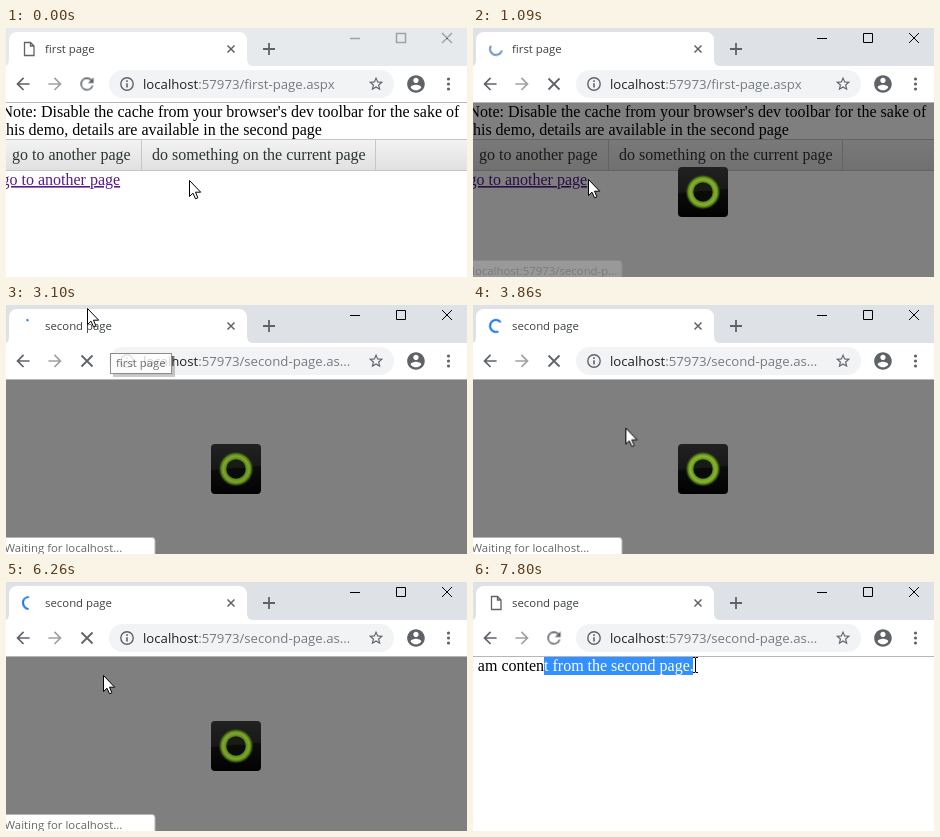
Write an HTML page that moves like this. It is 461 px wide and 249 px high and loops after 8 s.

```html
<!DOCTYPE html>
<html lang="en">
<head>
<meta charset="utf-8">
<title>Page loader demo</title>
<style>
html, body { margin: 0; width: 100%; height: 100%; overflow: hidden; background: #fff; }
svg { position: fixed; left: 0; top: 0; display: block; }
text { white-space: pre; }
.ui { font: 11.4px "Open Sans", "Noto Sans", sans-serif; fill: #3c4043; }
.url { font-size: 13.2px; fill: #202124; }
.path { fill: #777b80; }
.page { font: 16px "Liberation Serif", Times, serif; fill: #000; }
.menu { fill: #2e3436; }
.icon { fill: #5f6368; }
.status { fill: #666; }

/* one shared 8 s timeline; 1% = 80 ms */
.a { animation: 8s step-end infinite; }
.smooth { animation-timing-function: linear; }
.blurred { animation-name: blurred; }
.busy { animation-name: busy; }
.idle { animation-name: idle; }
.first { animation-name: first; }
.second { animation-name: second; }
.loaded { animation-name: loaded; }
.hover { animation-name: hover; }
.waiting { animation-name: waiting; }
.tip { animation-name: tip; }
.arrow { animation-name: arrow, arrowOn; animation-timing-function: linear, step-end; }
.beam { animation-name: beam, loaded; animation-timing-function: linear, step-end; }
.select { animation-name: select; }
.glow { animation: glow .8s ease-in-out infinite alternate; }

@keyframes blurred { 0% { opacity: 1 } 6.75%, 100% { opacity: 0 } }
@keyframes busy { 0% { opacity: 0 } 6.75% { opacity: 1 } 86%, 100% { opacity: 0 } }
@keyframes idle { 0% { opacity: 1 } 6.75% { opacity: 0 } 86%, 100% { opacity: 1 } }
@keyframes first { 0% { opacity: 1 } 32.8%, 100% { opacity: 0 } }
@keyframes second { 0% { opacity: 0 } 32.8%, 100% { opacity: 1 } }
@keyframes loaded { 0% { opacity: 0 } 86%, 100% { opacity: 1 } }
@keyframes arrowOn { 0% { opacity: 1 } 86%, 100% { opacity: 0 } }
@keyframes hover { 0%, 4.8% { opacity: 0 } 5.8%, 11.9% { opacity: 1 } 14.1%, 100% { opacity: 0 } }
@keyframes waiting { 0%, 16.5% { opacity: 0 } 17.4%, 89.8% { opacity: 1 } 92.7%, 100% { opacity: 0 } }
@keyframes tip { 0%, 35.6% { opacity: 0 } 36.6%, 38.4% { opacity: 1 } 40.5%, 100% { opacity: 0 } }
@keyframes arrow {
  0% { transform: translate(183px, 152px) }
  5.8%, 8% { transform: translate(104px, 152px) }
  11%, 14% { transform: translate(115px, 151px) }
  20% { transform: translate(200px, 162px) }
  24.5%, 25.4% { transform: translate(241px, 168px) }
  29.5% { transform: translate(104px, 28px) }
  33% { transform: translate(98px, 16px) }
  36% { transform: translate(87px, 6px) }
  38.5%, 39% { transform: translate(81px, 3px) }
  45% { transform: translate(130px, 90px) }
  52% { transform: translate(178px, 160px) }
  57.5%, 58.5% { transform: translate(183px, 187px) }
  67% { transform: translate(150px, 150px) }
  78%, 78.6% { transform: translate(97px, 93px) }
  86%, 100% { transform: translate(72px, 84px) }
}
@keyframes beam {
  0%, 94.7% { transform: translate(71px, 83px) }
  97.4%, 100% { transform: translate(222px, 83px) }
}
@keyframes select { 0%, 94.7% { width: 0 } 97.4%, 100% { width: 149px } }
@keyframes glow { from { opacity: .9 } to { opacity: 1 } }
</style>
</head>
<body>
<svg width="461" height="249" viewBox="0 0 461 249">
  <defs>
    <linearGradient id="bar" x2="0" y2="1">
      <stop stop-color="#f3f3f3"/><stop offset="1" stop-color="#e0e0e0"/>
    </linearGradient>
    <linearGradient id="tile" x2="0" y2="1">
      <stop stop-color="#151515"/><stop offset="1" stop-color="#020202"/>
    </linearGradient>
    <radialGradient id="ring" gradientUnits="userSpaceOnUse" cx="230" cy="164" r="18">
      <stop offset=".5" stop-color="#38500f"/>
      <stop offset=".58" stop-color="#6c9920"/>
      <stop offset=".72" stop-color="#8aba30"/>
      <stop offset=".84" stop-color="#5d8619"/>
      <stop offset="1" stop-color="#16200a" stop-opacity="0"/>
    </radialGradient>
    <clipPath id="sel"><rect class="a smooth select" x="71" y="75" width="0" height="18"/></clipPath>
    <path id="back" d="M20 11H7.83l5.59-5.59L12 4l-8 8 8 8 1.41-1.41L7.83 13H20z"/>
  </defs>

  <!-- page -->
  <rect width="461" height="249" fill="#fff"/>
  <g class="a first">
    <g class="page">
      <text x="-4.5" y="89">Note: Disable the cache from your browser's dev toolbar for the sake of</text>
      <text x="-4.5" y="107">this demo, details are available in the second page</text>
    </g>
    <rect y="111" width="461" height="32" fill="url(#bar)"/>
    <path d="M0 111.5H461M0 142.5H461M135.5 111V142M369.5 111V142" stroke="#c6c6c6"/>
    <g class="page">
      <text class="menu" x="6" y="132">go to another page</text>
      <text class="menu" x="146" y="132">do something on the current page</text>
      <text x="-4.5" y="157" fill="#551a8b" style="fill:#551a8b" text-decoration="underline">go to another page</text>
    </g>
  </g>
  <g class="a loaded">
    <text class="page" x="-4.5" y="89">I am content from the second page.</text>
    <g clip-path="url(#sel)">
      <rect x="71" y="75" width="149" height="18" fill="#3390ff"/>
      <text class="page" x="-4.5" y="89" style="fill:#fff">I am content from the second page.</text>
    </g>
  </g>

  <!-- overlay and loader -->
  <g class="a busy">
    <rect y="74" width="461" height="175" opacity=".5"/>
    <rect x="205" y="139" width="50" height="50" rx="4" fill="url(#tile)"/>
    <path d="M205 165V143a4 4 0 0 1 4-4H251a4 4 0 0 1 4 4V161Q230 162 205 165Z" fill="#fff" opacity=".05"/>
    <g class="glow">
      <circle cx="230" cy="164" r="18" fill="url(#ring)"/>
      <circle cx="230" cy="164" r="9.5" fill="#0a0c07"/>
    </g>
    <path d="M221 164a9 9 0 0 1 18-1Q230 162 221 164Z" fill="#fff" opacity=".06"/>
  </g>

  <!-- status bubbles -->
  <g class="a smooth hover">
    <path d="M-1 232.5H146a3 3 0 0 1 3 3V250H-1Z" fill="#fff" stroke="#b5b5b5"/>
    <text class="ui status" x="-1" y="247">localhost:57973/second-p...</text>
  </g>
  <g class="a smooth waiting">
    <path d="M-1 232.5H146a3 3 0 0 1 3 3V250H-1Z" fill="#fff" stroke="#b5b5b5"/>
    <text class="ui status" x="-1.5" y="247">Waiting for localhost...</text>
  </g>

  <!-- tab strip -->
  <rect width="461" height="38" fill="#dee1e6"/>
  <rect class="a blurred" width="461" height="38" fill="#e7eaed"/>
  <path d="M0 38Q3 37 3 31V12a8 8 0 0 1 8-8H233a8 8 0 0 1 8 8V31Q241 37 246 38Z" fill="#fff"/>
  <rect y="38" width="461" height="36" fill="#fff"/>
  <rect y="74" width="461" height="1" fill="#b4b6b9"/>
  <g fill="none" stroke="#000">
    <path d="M344 10.5H354M390.5 5.5H399.5V14.5H390.5ZM436 5L446 15M446 5L436 15"/>
    <path class="a blurred" d="M344 10.5H354M390.5 5.5H399.5V14.5H390.5ZM436 5L446 15M446 5L436 15" stroke="#a0a2a5" stroke-width="1.5"/>
  </g>
  <path d="M221.5 17.5L228.5 24.5M228.5 17.5L221.5 24.5" stroke="#5f6368" stroke-width="1.5"/>
  <path d="M257 21H269M263 15V27" stroke="#5f6368" stroke-width="1.8"/>
  <path class="a idle" d="M18.5 14.5H24.5L28 18V27.5H18.5ZM24.5 14.5V18H28" fill="#fff" stroke="#5f6368" stroke-width="1.3"/>
  <g class="a busy" id="spin">
    <circle id="arc" cx="23" cy="21" r="6" pathLength="360" fill="none" stroke-width="2"/>
  </g>
  <text class="ui a first" x="39" y="25">first page</text>
  <text class="ui a second" x="39" y="25">second page</text>

  <!-- toolbar -->
  <g class="icon">
    <use href="#back" transform="translate(7 46) scale(.83)"/>
    <use href="#back" transform="translate(59 46) scale(-.83 .83)" opacity=".6"/>
    <path class="a idle" transform="translate(71 46) scale(.83)" d="M17.65 6.35A7.96 7.96 0 1 0 19.73 14h-2.08A6 6 0 1 1 12 6c1.66 0 3.14.69 4.22 1.78L13 11h7V4z"/>
    <path class="a busy" d="M75.5 50.5L86.5 61.5M86.5 50.5L75.5 61.5" stroke="#5f6368" stroke-width="1.8"/>
    <rect x="103" y="42" width="285" height="28" rx="14" fill="#f1f3f4"/>
    <circle cx="121" cy="56" r="6.2" fill="none" stroke="#5f6368" stroke-width="1.4"/>
    <path d="M120.2 52.3h1.6v1.6h-1.6zM120.2 55.2h1.6v4.4h-1.6z"/>
    <path transform="translate(361.4 47.2) scale(.72)" d="M22 9.24l-7.19-.62L12 2 9.19 8.63 2 9.24l5.46 4.73L5.82 21 12 17.27 18.18 21l-1.63-7.03zM12 15.4l-3.76 2.27 1-4.28-3.32-2.88 4.38-.38L12 6.1l1.71 4.04 4.38.38-3.32 2.88 1 4.28z"/>
    <path transform="translate(399.4 45.4) scale(.88)" d="M12 2C6.48 2 2 6.48 2 12s4.48 10 10 10 10-4.48 10-10S17.52 2 12 2zm0 3c1.66 0 3 1.34 3 3s-1.34 3-3 3-3-1.34-3-3 1.34-3 3-3zm0 14.2c-2.5 0-4.71-1.28-6-3.22.03-1.99 4-3.08 6-3.08s5.97 1.09 6 3.08c-1.29 1.94-3.5 3.22-6 3.22z"/>
    <circle cx="442.5" cy="51" r="1.6"/><circle cx="442.5" cy="56" r="1.6"/><circle cx="442.5" cy="61" r="1.6"/>
  </g>
  <text class="ui url a first" x="137" y="61">localhost<tspan class="path">:57973/first-page.aspx</tspan></text>
  <text class="ui url a second" x="137" y="61">localhost<tspan class="path">:57973/second-page.as...</tspan></text>

  <!-- tooltip -->
  <g class="a smooth tip">
    <rect x="107" y="51" width="62" height="21" opacity=".25"/>
    <rect x="104.5" y="48.5" width="61" height="20" fill="#fff" stroke="#767676"/>
    <text class="ui" x="110" y="62" style="fill:#575757">first page</text>
  </g>

  <!-- pointers -->
  <path class="a arrow" d="M.5 .5V16.5L4 13.2L6.5 18.8L8.9 17.8L6.5 12.2H11.7Z" fill="#fff" stroke="#000"/>
  <path class="a beam" d="M-2 -7.5H0L.5 -7L1 -7.5H3M.5 -7V7M-2 7.5H0L.5 7L1 7.5H3" fill="none" stroke="#000"/>
</svg>
<script>
const spin = document.getElementById('spin');
const arc = document.getElementById('arc');
const WAIT = 63, LOAD = 1316, STEP = 77.24;

// cubic-bezier(.4, 0, .2, 1)
function ease(x) {
  let lo = 0, hi = 1, u = .5;
  for (let i = 0; i < 14; i++) {
    u = (lo + hi) / 2;
    const bx = 1.2 * u * (1 - u) ** 2 + .6 * u * u * (1 - u) + u ** 3;
    if (bx < x) lo = u; else hi = u;
  }
  return u * u * (3 - 2 * u);
}

function setArc(start, sweep, color) {
  if (sweep < 0) { start += sweep; sweep = -sweep; }
  arc.setAttribute('transform', `rotate(${start % 360} 23 21)`);
  arc.setAttribute('stroke-dasharray', `${Math.max(sweep, 8)} 360`);
  arc.setAttribute('stroke', color);
}

// counter-clockwise while waiting, then a growing and shrinking clockwise arc
function draw(t) {
  if (t < LOAD) {
    const turn = 360 * (t - WAIT) / 1320;
    setArc(270 - turn, Math.max(0, Math.min(200, turn)), '#6f93c4');
    return;
  }
  const e = t - LOAD, half = Math.floor(e / 666);
  let sweep = 270 * ease(e % 666 / 666);
  if (half % 2 === 0) sweep -= 270;
  setArc(310 + 360 * e / 1568 + 270 * Math.floor(half / 2), sweep, '#1a73e8');
}

function tick() {
  const anim = spin.getAnimations()[0];
  const t = ((anim && anim.currentTime) || 0) % 8000;
  draw(Math.floor(t / STEP + .1) * STEP);
  requestAnimationFrame(tick);
}
tick();
</script>
</body>
</html>
```
